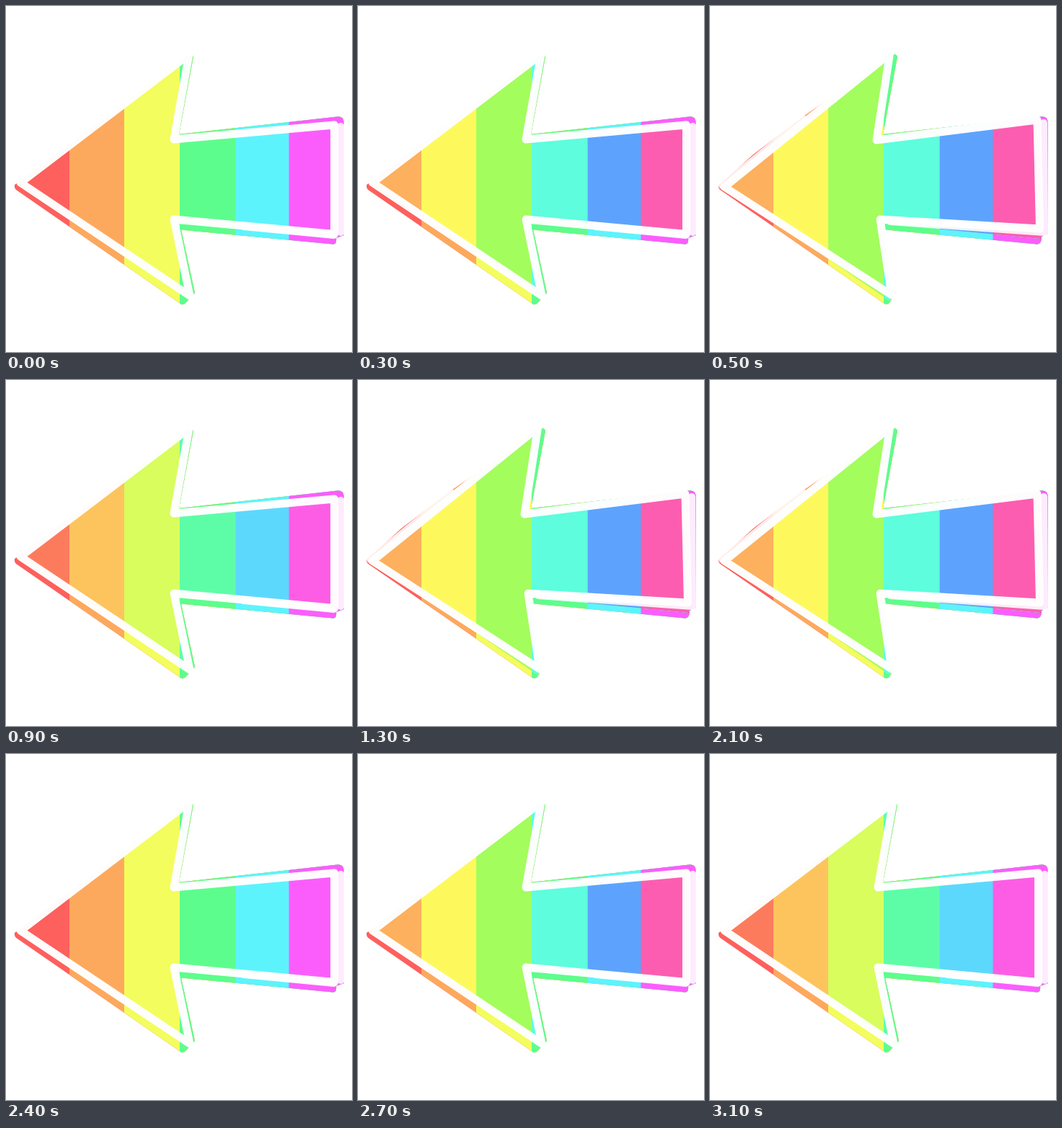
Animation, 480 px wide and 480 px high, one loop 3.2 s. Source, as an HTML page:

```html
<!DOCTYPE html>
<html lang="en">
<head>
<meta charset="utf-8">
<title>Rainbow arrow</title>
<style>
  html, body { margin: 0; width: 100%; height: 100%; overflow: hidden; background: #fff; }
  svg { display: block; width: 100%; height: 100%; }
  .line, .soft { fill: none; stroke: #fff; stroke-linejoin: round; stroke-linecap: round; filter: blur(.5px); }
  .line { stroke-width: 11; opacity: .98; }
  .soft { stroke-width: 10; opacity: .88; }
</style>
</head>
<body>
<svg id="stage" viewBox="0 0 480 480"></svg>
<script>
const STEP = 100, CYCLE = 8, TURN = 10;
const hues = [1, 28.5, 64, 138, 184, 299];
const edges = [0, 88, 164, 241, 318.6, 392.5];

// Each pose: coloured backing, turning face, white outline, translucent extra strokes.
const poses = [
  {
    back: 'M12 248 L254 68 L260 70 L240 178 L460 153.5 Q468 153 468.5 160 L468.5 318 L458 322 Q459 330.5 454 330.5 L243 310.5 L262 398 L250 411 Q245 417 240 411.5 L14 255 Q11 252 12 248Z',
    face: 'M20 245 L254 67 L233 185 L458 163 L458 317 L233 296 L255 402Z',
    line: 'M20 245 L254 67 L233 185 L455.5 165 L455.5 316.5 L233 296 L255 402Z',
    soft: 'M464.5 167 V314 M330 306 L455 318'
  },
  {
    back: 'M12 249 L60 206 L130 153 L253 68 Q257 65 260 70 L240 178 L460 153.5 Q468 153 468.5 160 L468.5 316 L460 320 Q460 330.5 454 330.5 L240 310 L252 406 Q247 418 240 411.5 L14 255 Q11 252 12 249Z',
    face: 'M20 251 L249.5 66 L231 186 L454 158 L460 323 L240 302 L251 400 L249 409Z',
    line: 'M20 251 L249.5 66 L231 186 L454 158 L457.5 309 L236 296 L252 401Z',
    soft: 'M463 162 L464 314 L250 299 M17 249 L130 157'
  }
];

const tint = (h, turn) => `hsl(${h + turn}, 98%, 68%)`;
const bands = hues.map((h, i) =>
  `<rect x="${edges[i]}" width="${480 - edges[i]}" height="480" fill="${tint(h, 0)}"/>`).join('');

const stage = document.getElementById('stage');
stage.innerHTML = poses.map((p, i) => `
  <clipPath id="back${i}"><path d="${p.back}"/></clipPath>
  <clipPath id="face${i}"><path d="${p.face}"/></clipPath>
  <g class="pose">
    <g clip-path="url(#back${i})">${bands}</g>
    <g class="face" clip-path="url(#face${i})">${bands}</g>
    <path class="soft" d="${p.soft}"/>
    <path class="line" d="${p.line}"/>
  </g>`).join('');

const groups = [...stage.querySelectorAll('.pose')];
const faces = groups.map(g => [...g.querySelectorAll('.face rect')]);

function draw(ms) {
  const k = Math.floor(ms / STEP) % CYCLE;
  const turn = TURN * (CYCLE / 2 - Math.abs(k - CYCLE / 2));
  const pose = k === 4 || k === 5 ? 1 : 0;
  groups.forEach((g, i) => g.setAttribute('visibility', i === pose ? 'visible' : 'hidden'));
  faces[pose].forEach((r, i) => r.setAttribute('fill', tint(hues[i], turn)));
}

const start = performance.now();
function tick() {
  draw(performance.now() - start);
  requestAnimationFrame(tick);
}
tick();
</script>
</body>
</html>
```
